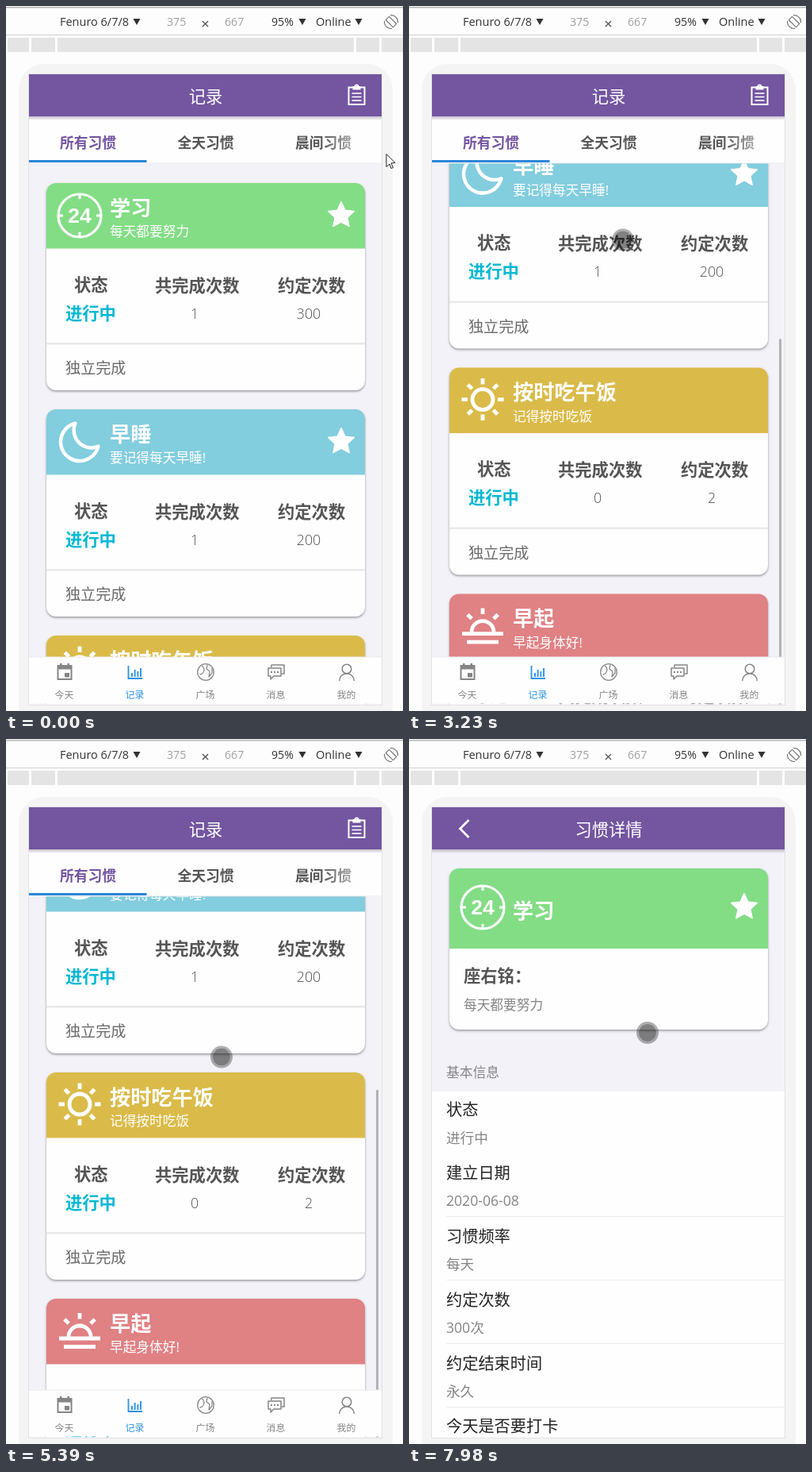
Recreate the animation shown at these times as an HTML page with a canvas. Size 501 by 888 pixels, loop 8 s.

```html
<!DOCTYPE html>
<html lang="zh-CN">
<head>
<meta charset="utf-8">
<title>习惯记录</title>
<style>
html, body { margin: 0; width: 100%; height: 100%; overflow: hidden; background: #fdfdfd; }
canvas { display: block; }
</style>
</head>
<body>
<canvas id="stage" width="501" height="888"></canvas>
<script>
const ctx = document.getElementById('stage').getContext('2d');
const FONT = '"Open Sans", "Noto Sans CJK SC", "Noto Sans CJK", sans-serif';
const PURPLE = '#7355a0', BLUE = '#2c93e8', CYAN = '#00b8d4', LAVENDER = '#f3f2f8';
const WHITE = '#fefefe', GRAY = '#858585', DARK = '#555';
const TAU = Math.PI * 2;

const LOOP = 8000, TICK = 80, PHASE = 30;
const HOVER = 150, FLICK = 2510, FLICK_END = 4310, DRAG = 4890, DRAG_END = 6350, TAP = 7580, DETAIL = 7980;
const MAX_SCROLL = 430.4;

const CARDS = [
  { color: '#83dd85', icon: clock, title: '学习', note: '每天都要努力', done: 1, goal: 300, star: true },
  { color: '#82cdde', icon: moon, title: '早睡', note: '要记得每天早睡!', done: 1, goal: 200, star: true },
  { color: '#dabb49', icon: sun, title: '按时吃午饭', note: '记得按时吃饭', done: 0, goal: 2 },
  { color: '#e08184', icon: sunrise, title: '早起', note: '早起身体好!', done: 0, goal: 20 }
];
const DETAILS = [
  ['状态', '进行中'], ['建立日期', '2020-06-08'], ['习惯频率', '每天'],
  ['约定次数', '300次'], ['约定结束时间', '永久'], ['今天是否要打卡', '是']
];

// Motion
const ramp = (t, from, to) => Math.min(1, Math.max(0, (t - from) / (to - from)));
const mix = (a, b, k) => a + (b - a) * k;
const easeOut = (k, power) => 1 - (1 - k) ** power;

function scrollAt(t) {
  if (t < DRAG) return MAX_SCROLL * easeOut(ramp(t, FLICK, FLICK_END), 3);
  return MAX_SCROLL * (1 - ramp(t, DRAG, DRAG_END) ** 1.88);
}
function barAlpha(t) {
  if (t < FLICK) return 0;
  if (t < DRAG) return mix(1, .2, ramp(t, 4200, 4460));
  return 1 - ramp(t, 6700, 7040);
}
function hoverAt(t) {
  const stops = [[HOVER, 478, 204], [850, 395, 333], [1150, 440, 318], [1470, 345, 346], [1900, 343, 348], [2200, 450, 350]];
  const next = stops.findIndex(stop => t < stop[0]);
  if (next < 0) return [450, 350];
  const a = stops[Math.max(0, next - 1)], b = stops[next];
  const k = ramp(t, a[0], b[0]);
  return [mix(a[1], b[1], k), mix(a[2], b[2], k)];
}
function pointerAt(t) {
  if (t < FLICK) return hoverAt(t);
  if (t < DRAG) return [mix(270, 273, ramp(t, 3230, 4460)), Math.max(293, 632 - scrollAt(t)) + 18 * ramp(t, 3230, 4460)];
  if (t < DRAG_END) {
    const k = ramp(t, DRAG, DRAG_END);
    return [mix(273, 270, k), mix(311, 758, k ** 1.5)];
  }
  const k = ramp(t, DRAG_END, TAP);
  return [mix(270, 301, easeOut(k, 3)), mix(758, 370, easeOut(k, 1.6))];
}
const isPressed = t => t < 1700 || (t >= FLICK && t < 3500) || (t >= DRAG && t < 6300) || t >= TAP;

// Drawing helpers
function text(str, x, y, size, color, weight = 400, align = 'left') {
  ctx.font = `${weight} ${size}px ${FONT}`;
  ctx.fillStyle = color;
  ctx.textAlign = align;
  ctx.fillText(str, x, y + size * .37);
}
function rect(x, y, w, h, color) {
  ctx.fillStyle = color;
  ctx.fillRect(x, y, w, h);
}
function rounded(x, y, w, h, r, color) {
  ctx.beginPath();
  ctx.roundRect(x, y, w, h, r);
  ctx.fillStyle = color;
  ctx.fill();
}
function path(points, close) {
  ctx.beginPath();
  points.forEach(([x, y]) => ctx.lineTo(x, y));
  if (close) ctx.closePath();
}
function line(...points) { path(points); ctx.stroke(); }
function ring(x, y, r, from = 0, to = TAU) {
  ctx.beginPath();
  ctx.arc(x, y, r, from, to);
  ctx.stroke();
}
function pen(color, width, join = 'miter') {
  ctx.strokeStyle = color;
  ctx.lineWidth = width;
  ctx.lineJoin = join;
}
function fade(x, y, w, h, dx, dy, from, to) {
  const g = ctx.createLinearGradient(x, y, x + dx, y + dy);
  g.addColorStop(0, from);
  g.addColorStop(1, to);
  rect(x, y, w, h, g);
}
function clipped(y, bottom, draw) {
  ctx.save();
  ctx.beginPath();
  ctx.rect(29, y, 445, bottom - y);
  ctx.clip();
  draw();
  ctx.restore();
}
function rays(x, y, inner, outer, count, first = 0, last = count - 1) {
  for (let i = first; i <= last; i++) {
    const c = Math.cos(i * TAU / count), s = Math.sin(i * TAU / count);
    line([x + c * inner, y + s * inner], [x + c * outer, y + s * outer]);
  }
}

// Card icons, centred on (x, y)
function clock(x, y) {
  pen('#fff', 3.2);
  ring(x, y, 27);
  rays(x, y, 21, 27, 4);
  ctx.font = 'bold 26.5px "Liberation Sans", sans-serif';
  ctx.fillStyle = '#fff';
  ctx.textAlign = 'center';
  ctx.fillText('24', x, y + 8.5);
}
function moon(x, y) {
  const r = 24;
  pen('#fff', 4.5, 'round');
  ctx.beginPath();
  ctx.arc(x, y, r, -1.81, .24, true);
  ctx.arc(x + r * .615, y - r * .615, r * .923, 1.17, 3.54);
  ctx.closePath();
  ctx.stroke();
}
function sun(x, y) {
  pen('#fff', 4.8);
  ring(x, y - 1, 13);
  rays(x, y - 1, 19, 26.5, 8);
}
function sunrise(x, y) {
  pen('#fff', 4.8);
  ring(x, y + 7, 14, Math.PI, TAU);
  rays(x, y + 4, 19.5, 27, 8, 5, 7);
  line([x - 26, y + 9], [x + 26, y + 9]);
  line([x - 20, y + 19.5], [x + 20, y + 19.5]);
}
function star(x, y) {
  path(Array.from({ length: 10 }, (_, i) => {
    const a = -TAU / 4 + i * TAU / 10, r = i % 2 ? 8.2 : 17.2;
    return [x + Math.cos(a) * r, y + .8 + Math.sin(a) * r];
  }), true);
  ctx.fillStyle = '#fff';
  ctx.fill();
  pen('#fff', 1.5, 'round');
  ctx.stroke();
}

function cardShell(y, height, head, color) {
  ctx.save();
  ctx.shadowColor = 'rgba(0,0,0,.38)';
  ctx.shadowBlur = 3;
  ctx.shadowOffsetY = 1.5;
  rounded(51, y, 402, height, 12, WHITE);
  ctx.restore();
  rounded(51, y, 402, head, [12, 12, 0, 0], color);
}
function habitCard(card, y) {
  cardShell(y, 261, 82.5, card.color);
  card.icon(93, y + 41);
  text(card.title, 131, y + 31, 26.2, '#fff', 900);
  text(card.note, 131, y + 61, 16.7, '#fff');
  if (card.star) star(423, y + 40);
  text('状态', 86, y + 128, 21.3, DARK, 700);
  text('共完成次数', 188, y + 129, 21.3, DARK, 700);
  text('约定次数', 343, y + 129, 21.3, DARK, 700);
  text('进行中', 75, y + 164, 21.3, CYAN, 700);
  text(card.done, 238, y + 164, 17.8, DARK, 300, 'center');
  text(card.goal, 382, y + 164, 17.8, DARK, 300, 'center');
  rect(51, y + 201, 402, 2.5, '#e9e9e9');
  text('独立完成', 75, y + 233, 19.1, '#6a6a6a', 300);
}

function toolbar() {
  rect(0, 1, 501, 1.5, '#b4b4b4');
  rect(0, 36, 501, 1, '#cfcfcf');
  text('Fenuro 6/7/8', 68, 20, 14.5, '#333');
  text('375', 203, 20, 14.2, '#a0a0a0');
  text('667', 276, 20, 14.2, '#a0a0a0');
  text('95%', 335, 20, 14.2, '#333');
  text('Online', 391, 20, 14.5, '#333');
  for (const x of [165, 374, 445]) {
    path([[x - 4.5, 16], [x + 4.5, 16], [x, 24]], true);
    ctx.fillStyle = '#333';
    ctx.fill();
  }
  ctx.save();
  ctx.translate(251.5, 22.5);
  pen(DARK, 1.3);
  rays(0, 0, 0, 0, 1);
  ctx.rotate(TAU / 8);
  rays(0, 0, 0, 5, 4);
  ctx.restore();
  ctx.save();
  ctx.translate(486, 20);
  ctx.rotate(-TAU / 8);
  pen('#666', 1.1, 'round');
  ctx.strokeRect(-3, -6.5, 6, 13);
  ring(0, 0, 8.5, -.9, .9);
  ring(0, 0, 8.5, Math.PI - .9, Math.PI + .9);
  ctx.restore();
}

function device() {
  rect(0, 0, 501, 888, '#fdfdfd');
  toolbar();
  rect(2, 40, 499, 18, '#e4e4e4');
  for (const x of [29, 62, 439, 471]) rect(x, 40, 3, 18, '#fdfdfd');
  rounded(16, 73, 472, 840, 32, '#f4f4f4');
  rect(28, 85, 447, 796, '#e2e2e4');
  rect(29, 86, 445, 794, LAVENDER);
}

function header(title) {
  rect(29, 86, 445, 53, PURPLE);
  text(title, 252, 114, 21.3, '#fff', 400, 'center');
  fade(29, 139, 445, 5, 0, 5, 'rgba(60,50,80,.3)', 'rgba(60,50,80,0)');
}

function clipboard() {
  pen('#fff', 2);
  ctx.strokeRect(432.5, 102.5, 20, 21.5);
  rect(437.5, 101, 10, 4.5, '#fff');
  ring(442.5, 101.5, 2);
  pen('#fff', 1.6);
  for (let y = 110; y < 120; y += 4.5) line([436.5, y], [448.5, y]);
}

function tabStrip() {
  rect(29, 139, 445, 58, WHITE);
  ['所有习惯', '全天习惯', '晨间习惯'].forEach((label, i) =>
    text(label, 68 + i * 148.5, 172, 17.8, i ? DARK : PURPLE, 700));
  fade(395, 150, 79, 44, 60, 0, 'rgba(254,254,254,0)', 'rgba(254,254,254,.7)');
  rect(29, 194, 148.5, 3, '#2c86d8');
}

function calendarIcon(x, y) {
  pen(GRAY, 2);
  ctx.strokeRect(x - 8.5, y - 8, 17, 17);
  rect(x - 9, y - 9, 18, 5.5, GRAY);
  for (const dx of [-6, 3.5]) rect(x + dx, y - 11, 2.5, 4, GRAY);
  rect(x, y + 1, 6, 5.5, GRAY);
}
function chartIcon(x, y) {
  pen(BLUE, 1.8);
  line([x - 8.5, y - 8], [x - 8.5, y + 8], [x + 9, y + 8]);
  for (let i = 0; i < 4; i++) rect(x - 5 + i * 3.7, y + 6, 1.9, -(5 + i * 2 + (i === 1 ? 2 : 0) - (i === 2 ? 2 : 0)), BLUE);
}
function globeIcon(x, y) {
  pen('#8a8a8a', 1.3, 'round');
  ring(x, y, 10.3);
  ring(x - 8, y - 3, 6, -1, 1.5);
  line([x + 2, y - 9], [x + 1, y - 4], [x + 5, y - 1], [x + 4, y + 6], [x + 8, y + 1], [x + 8, y - 5]);
}
function chatIcon(x, y) {
  pen(GRAY, 1.5, 'round');
  line([x - 6, y - 6], [x - 6, y - 9], [x + 10, y - 9], [x + 10, y + 2], [x + 7, y + 2]);
  path([[x - 10, y - 5], [x + 6, y - 5], [x + 6, y + 5], [x - 3, y + 5], [x - 7, y + 9], [x - 7, y + 5], [x - 10, y + 5]], true);
  ctx.stroke();
  for (let i = -1; i < 2; i++) rect(x - 3 + i * 4, y - 1, 2, 2, GRAY);
}
function personIcon(x, y) {
  pen(GRAY, 1.5);
  ring(x, y - 4, 5.8);
  ring(x, y + 11, 9.3, Math.PI, TAU);
}

function bottomTabs() {
  rect(29, 820, 445, 58, WHITE);
  rect(29, 878, 445, 2, 'rgba(254,254,254,.5)');
  rect(29, 819.5, 445, 1, '#ececef');
  const tabs = [['今天', calendarIcon], ['记录', chartIcon], ['广场', globeIcon], ['消息', chatIcon], ['我的', personIcon]];
  tabs.forEach(([label, icon], i) => {
    const x = 74 + i * 89;
    icon(x, 839);
    text(label, x - .5, 868, 11.9, i === 1 ? BLUE : GRAY, 400, 'center');
  });
}

function habitList(t) {
  const scroll = scrollAt(t);
  clipped(198.5, 880, () => {
    CARDS.forEach((card, i) => habitCard(card, 223 + i * 285 - scroll));
    ctx.globalAlpha = barAlpha(t);
    rounded(467, 202.4 + scroll * .642, 3, 508, 1.5, '#b2b2b5');
    ctx.globalAlpha = 1;
  });
  tabStrip();
  header('记录');
  clipboard();
  bottomTabs();
}

function habitDetail() {
  header('习惯详情');
  pen('#fff', 2.8);
  line([75.5, 102], [64.5, 113], [75.5, 124]);
  cardShell(163, 203, 101, CARDS[0].color);
  clock(93, 212);
  text('学习', 131, 216, 26.2, '#fff', 900);
  star(423, 211);
  text('座右铭：', 69, 298, 21.3, DARK, 700);
  text('每天都要努力', 69, 335, 16.7, GRAY);
  text('基本信息', 47, 420, 16.8, GRAY);
  clipped(444, 880, () => {
    rect(29, 444, 445, 436, WHITE);
    DETAILS.forEach(([label, value], i) => {
      const y = 467 + i * 79.8;
      text(label, 47, y, 20.2, '#222');
      text(value, 47, y + 35, 17.6, GRAY);
      if (i) rect(47, Math.round(y + 54.5), 427, 1, '#ededed');
    });
  });
}

function arrow(x, y) {
  path([[x, y], [x, y + 16], [x + 4, y + 12.5], [x + 6, y + 18], [x + 8.5, y + 17], [x + 6, y + 11.5], [x + 11, y + 11]], true);
  ctx.fillStyle = '#fff';
  ctx.fill();
  pen('#222', 1);
  ctx.stroke();
}
function touch(t) {
  const [x, y] = pointerAt(t);
  const down = isPressed(t);
  ctx.beginPath();
  ctx.arc(x, y, 11, 0, TAU);
  ctx.fillStyle = `rgba(0,0,0,${down ? .49 : .44})`;
  ctx.fill();
  pen(`rgba(0,0,0,${down ? .31 : .24})`, 3);
  ring(x, y, 12.5);
}

function render(now) {
  const time = now % LOOP;
  const t = Math.floor((time - PHASE) / TICK) * TICK + PHASE;
  device();
  if (time >= DETAIL) habitDetail();
  else habitList(t);
  if (time < HOVER) arrow(480, 186.5);
  else touch(t);
  requestAnimationFrame(render);
}
requestAnimationFrame(render);
</script>
</body>
</html>
```
